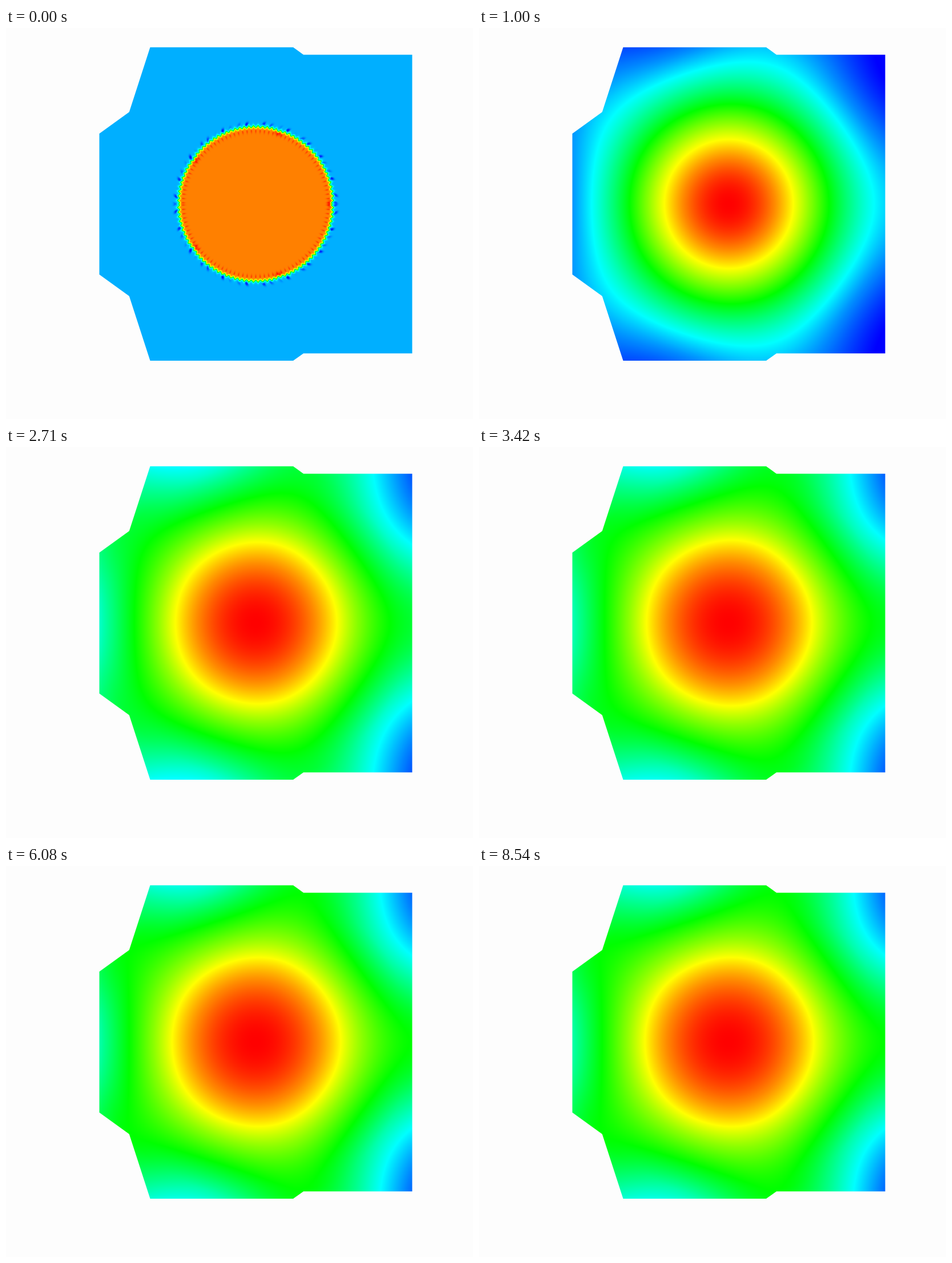
An HTML page with a canvas for the animation above (8580 ms loop, 818x684 px).

```html
<!DOCTYPE html>
<html lang="en">
<head>
<meta charset="utf-8">
<title>Diffusion on a pentagonal domain</title>
<style>
  html, body { margin: 0; width: 100%; height: 100%; overflow: hidden; background: #fdfdfd; }
  canvas {
    position: absolute; left: 163px; top: 33px;
    clip-path: polygon(89.5px 0.7px, 340px 0.7px, 358px 13.7px, 548.5px 13.7px,
      548.5px 536.3px, 358px 536.3px, 340px 549px, 89.5px 549px, 52.8px 436px,
      0.5px 398.3px, 0.5px 151.7px, 52.8px 114px);
  }
</style>
</head>
<body>
<canvas id="view" width="550" height="550"></canvas>
<script>
const LOOP = 8580, STEP = 1000 / 24, SIZE = 550, CENTER_X = 274.5, CENTER_Y = 274.8;
const DISC = 135, CIRCUM = 274, CELL = 2, CELLS = 400, FREE_STEPS = 24;
const ctx = document.getElementById('view').getContext('2d');
const image = ctx.createImageData(SIZE, SIZE);
const pixels = new Uint32Array(image.data.buffer);

// Per pixel: radius in cells, angle, and the fivefold angular term
const radius = new Float32Array(SIZE * SIZE);
const angle = new Float32Array(SIZE * SIZE);
const fivefold = new Float32Array(SIZE * SIZE);
for (let y = 0, i = 0; y < SIZE; y++) {
  for (let x = 0; x < SIZE; x++, i++) {
    const dx = x + 0.5 - CENTER_X, dy = y + 0.5 - CENTER_Y;
    const r = Math.hypot(dx, dy), q = r / CIRCUM;
    radius[i] = r / CELL;
    angle[i] = Math.abs(Math.atan2(dy, dx));
    fivefold[i] = Math.pow(q, q < 1 ? 5 : 2.3) * Math.cos(5 * angle[i]);
  }
}

// Blue, cyan, green, yellow, red
const palette = new Uint32Array(1025);
for (let i = 0; i <= 1024; i++) {
  const v = i / 256;
  const level = c => Math.round(255 * Math.max(0, Math.min(1, c)));
  const red = level(v - 2), green = level(Math.min(v, 4 - v)), blue = level(2 - v);
  palette[i] = 0xff000000 | blue << 16 | green << 8 | red;
}
const color = v => palette[v <= 0 ? 0 : v >= 1 ? 1024 : v * 1024 | 0];

// Radial heat flow from a uniform disc, scaled to its peak
function diffuse() {
  let u = Float64Array.from({ length: CELLS }, (_, i) =>
    Math.max(0, Math.min(1, DISC / CELL - i + 0.5)));
  const profiles = [u], substeps = 437, k = 0.2;
  for (let n = 0; n < FREE_STEPS; n++) {
    u = u.slice();
    for (let s = 0; s < substeps; s++) {
      let left = u[0];
      u[0] += 4 * k * (u[1] - u[0]);
      for (let i = 1; i < CELLS - 1; i++) {
        const here = u[i], right = u[i + 1];
        u[i] += k * (right - 2 * here + left + (right - left) / (2 * i));
        left = here;
      }
    }
    profiles.push(u);
  }
  return profiles.map(p => p.map(v => v / p[0]));
}
const early = diffuse();
const steady = Float64Array.from({ length: CELLS }, (_, i) => {
  const q = i * CELL / 148;
  return q < 1 ? 1 - 0.25 * q * q : 0.75 - 0.5425 * Math.log(q);
});

const bell = (x, width) => Math.exp(-x * x / (width * width));

// Sharp disc with a ringing, serrated rim
function start(i) {
  const r = radius[i] * CELL, a = angle[i];
  if (r < 115 || r > 155) return r < DISC ? 0.875 : 0.1725;
  const teeth = Math.sin(105 * a);
  const sector = Math.PI / 5;
  const corner = bell(Math.abs((a + sector) % (2 * sector) - sector), 0.05);
  const spots = Math.max(0, Math.sin(60 * a + 1 + (r - 140) * 0.2))
    * (0.5 + 0.5 * Math.sin(23 * a));
  const rim = 1 / (1 + Math.exp((r - DISC + 1.6 * teeth + 1.5 * corner) / 1.3));
  return 0.1725 + 0.7025 * rim
    - 0.17 * spots * bell(r - 140.5, 3.5)
    + 0.07 * Math.max(0, teeth) * bell(r - 128, 4)
    + 0.1 * corner * bell(r - 130, 4);
}

function draw(frame) {
  if (frame === 0) {
    for (let i = 0; i < pixels.length; i++) pixels[i] = color(start(i));
  } else {
    const t = frame * STEP;
    const settle = t < 1000 ? 0 : 1 - Math.exp((1000 - t) / 930);
    const base = early[Math.min(frame, FREE_STEPS)];
    const profile = base.map((v, i) => v + (steady[i] - v) * settle);
    const bend = 0.034 * Math.min(1, t / 1000) ** 2 + 0.05 * settle;
    for (let i = 0; i < pixels.length; i++) {
      const c = radius[i], n = c | 0, p = profile[n];
      pixels[i] = color(p + (profile[n + 1] - p) * (c - n) + bend * fivefold[i]);
    }
  }
  ctx.putImageData(image, 0, 0);
}

let shown = -1;
const begin = performance.now();
function tick() {
  const t = (performance.now() - begin) % LOOP;
  // 24 steps a second, held on a 10 ms clock
  const frame = Math.floor((Math.floor(t / 10) + 0.49) * 10 / STEP);
  if (frame !== shown) draw(shown = frame);
  requestAnimationFrame(tick);
}
tick();
</script>
</body>
</html>
```
